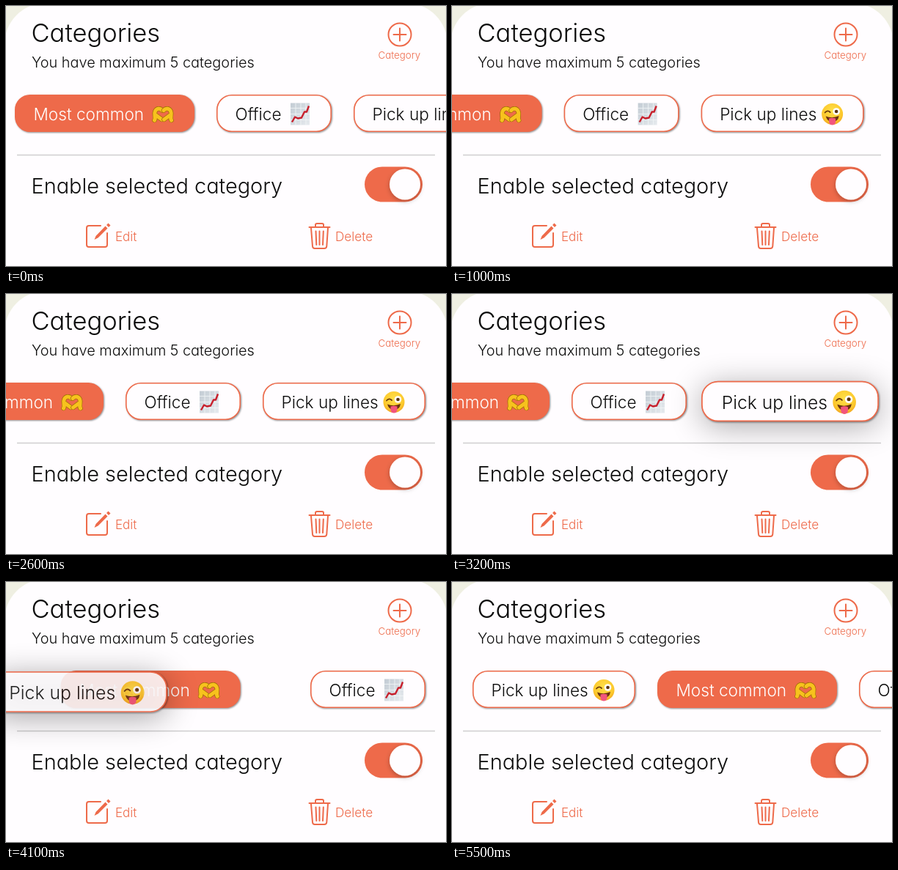
An HTML page that plays this animation: 600 px wide and 355 px high, repeating every 5.6 s.

```html
<!DOCTYPE html>
<html lang="en">
<head>
<meta charset="utf-8">
<title>Category chips</title>
<style>
  html, body { margin: 0; width: 100%; height: 100%; overflow: hidden; background: #efefe2; }
  svg { display: block; width: 600px; height: 355px; }
  text {
    font-family: Inter, Lato, sans-serif;
    font-weight: 300;
    font-feature-settings: "cv11";
    font-optical-sizing: none;
    fill: #0c0c0c;
  }
  .accent text { fill: #ee6a4a; }
  .line { fill: none; stroke: #ee6a4a; stroke-width: 2; stroke-linecap: round; stroke-linejoin: round; }
  .chip rect.box { fill: #fffdff; stroke: #ee6a4a; stroke-width: 1.6; filter: drop-shadow(1.8px 1.8px 1px rgba(0, 0, 0, .45)); }
  .chip.on rect.box { fill: #ee6a4a; }
  .chip.on text { fill: #fff; }
  .chip text { font-size: 22.6px; }
</style>
</head>
<body>
<svg viewBox="0 0 600 355">
  <defs>
    <filter id="soft" x="-60%" y="-200%" width="220%" height="500%"><feGaussianBlur stdDeviation="20"/></filter>
    <filter id="knob" x="-40%" y="-40%" width="180%" height="180%"><feDropShadow dx="0" dy="2" stdDeviation="3" flood-opacity=".28"/></filter>
    <radialGradient id="face" cx=".5" cy=".35" r=".7">
      <stop offset="0" stop-color="#ffe04a"/><stop offset=".7" stop-color="#fcc72b"/><stop offset="1" stop-color="#ee9a1c"/>
    </radialGradient>
    <linearGradient id="paper" x1="0" y1="0" x2="1" y2="1">
      <stop offset="0" stop-color="#c3ccd4"/><stop offset="1" stop-color="#e6eaee"/>
    </linearGradient>
    <g id="hand" fill="none" stroke-linecap="round" stroke-linejoin="round">
      <path id="arm" d="M-11.500 8.500C-9 5 -13 1 -10.500 -4C-8.500 -8 -4 -8.500 -1 -5M-9 2L-1.500 7.500" stroke="#a8700c" stroke-width="6.200"/>
      <use href="#arm"/>
      <path d="M-11.500 8.500C-9 5 -13 1 -10.500 -4C-8.500 -8 -4 -8.500 -1 -5M-9 2L-1.500 7.500" stroke="#f7c21d" stroke-width="5"/>
    </g>
    <g id="heart"><use href="#hand"/><use href="#hand" transform="scale(-1 1)"/></g>
    <g id="chart">
      <rect x="-13" y="-15" width="26" height="30" fill="url(#paper)"/>
      <path d="M-13 -8H13M-13 0H13M-13 8H13M-6 -15V15M1 -15V15M8 -15V15" stroke="#f3f6f8" stroke-width=".8"/>
      <path d="M-11 11L-7 4L-3 6L2 5L6 -3L9 -3L12 -11" fill="none" stroke="#c8202c" stroke-width="2.400" stroke-linejoin="round"/>
    </g>
    <g id="wink">
      <circle r="14.500" fill="url(#face)"/>
      <path d="M-10 -2Q-6.500 -6 -3 -2.500" fill="none" stroke="#6b3b0c" stroke-width="1.800" stroke-linecap="round"/>
      <circle cx="5.500" cy="-3.500" r="4.800" fill="#fff"/>
      <circle cx="5.500" cy="-3.500" r="2.300" fill="#5a3310"/>
      <path d="M-9 3Q0 6.500 9 2.500Q8 10.500 0 10.500Q-7 10.500 -9 3Z" fill="#6b3210"/>
      <path d="M-4.500 6Q0 4.500 4.500 6V10.500A4.500 4.500 0 0 1 -4.500 10.500Z" fill="#f2557c"/>
    </g>
  </defs>

  <rect width="600" height="355" fill="#efefe2"/>
  <rect x="-2" y="-4" width="604" height="440" rx="56" fill="#fffdff"/>
  <text x="34.500" y="48.500" font-size="34.500">Categories</text>
  <text x="35" y="84" font-size="19.900">You have maximum 5 categories</text>
  <path d="M15 203.500H585" stroke="#cfcdcf" stroke-width="1.500"/>
  <text x="34.500" y="256" font-size="28.900">Enable selected category</text>
  <rect x="489" y="219.500" width="79" height="48" rx="24" fill="#ee6a4a"/>
  <circle cx="544" cy="243.500" r="21" fill="#fffdff" filter="url(#knob)"/>

  <g class="accent">
    <g class="line">
      <circle cx="537" cy="39" r="15.500"/>
      <path d="M528.500 39H545.500M537 30.500V47.500"/>
      <path d="M129 300H113Q110 300 110 303V326Q110 329 113 329H135Q138 329 138 326V310"/>
      <path d="M413.500 302H441.500M422 301V299Q422 297 424 297H431Q433 297 433 299V301"/>
      <path d="M416 303L418 328Q418.300 331 421 331H434Q437 331 437.300 328L439 303M422.500 307.500L423.300 326M427.500 307.500V326M432.800 307.500L432 326"/>
    </g>
    <path d="M122.500 314L135.500 300.500L138.500 303.500L125.500 316.500L120.500 319ZM137 299L139.500 296.500L142.500 299.500L140 302Z" fill="#ee6a4a"/>
    <text x="507.500" y="72" font-size="13.300">Category</text>
    <text x="149" y="321" font-size="17">Edit</text>
    <text x="449" y="321" font-size="17.200">Delete</text>
  </g>
  <g id="row"></g>
</svg>
<script>
const LOOP = 5600, STEP = 100, H = 51, MID_Y = 146.5, GAP = 30;
const row = document.getElementById('row');

function makeChip(label, w, icon, iconX, cls = '') {
  const left = -w / 2;
  row.insertAdjacentHTML('beforeend', `<g class="chip ${cls}">
    <rect class="glow" x="${left}" y="${-H / 2 + 6}" width="${w}" height="${H}" rx="20" filter="url(#soft)" opacity="0"/>
    <g class="body">
      <rect class="box" x="${left + .8}" y="${-H / 2 + .8}" width="${w - 1.6}" height="${H - 1.6}" rx="20"/>
      <text x="${left + 25.5}" y="9.5">${label}</text>
      <use href="#${icon}" x="${left + iconX}" y="1"/>
    </g></g>`);
  const el = row.lastElementChild;
  const part = s => el.querySelector(s);
  return { el, w, glow: part('.glow'), body: part('.body'), text: part('text') };
}

const most = makeChip('Most common', 245, 'heart', 202, 'on');
const office = makeChip('Office', 157, 'chart', 114);
const pick = makeChip('Pick up lines', 222, 'wink', 179);

const place = (chip, x, y = MID_Y, scale = 1) =>
  chip.el.setAttribute('transform', `translate(${x} ${y}) scale(${scale})`);
const mix = (a, b, p) => a + (b - a) * p;
const span = (t, a, b) => Math.min(1, Math.max(0, (t - a) / (b - a)));
const smooth = (t, a, b) => { const p = span(t, a, b); return p * p * (3 - 2 * p); };
const easeOut = (t, a, b, n) => 1 - (1 - span(t, a, b)) ** n;

function draw(t) {
  // pull past the end, spring back, later fling to the start
  const scroll = 138 * smooth(t, 0, 650) - 14 * smooth(t, 800, 1400) - 140 * easeOut(t, 4500, 5235, 3);
  const start = 12 - scroll;
  const slot = pick.w + GAP;

  place(most, start + most.w / 2 + slot * smooth(t, 3900, 4200));
  place(office, start + most.w + GAP + office.w / 2 + slot * smooth(t, 3630, 4000));

  // lift, drag to the left, drop into the first slot
  const drop = easeOut(t, 4600, 5100, 2);
  const lift = smooth(t, 2700, 3300) * (1 - drop);
  const held = span(t, 3300, 3301) * (1 - drop);
  const home = start + pick.w / 2 + (t < 3600 ? most.w + office.w + 2 * GAP : 0);
  const drag = smooth(t, 3300, 3800);
  const dragX = mix(461, 93.3, drag) + 4.7 * smooth(t, 3800, 4000);
  place(pick, mix(home, dragX, held), MID_Y + 3.5 * drag * (1 - drop), 1 + .097 * lift);
  pick.glow.setAttribute('opacity', .36 * lift);
  pick.body.setAttribute('opacity', 1 - .13 * drag * (1 - drop));
  pick.text.setAttribute('opacity', 1 - .3 * span(t, 4600, 4700) * (1 - span(t, 4700, 5000)));
}

const began = performance.now();
function tick() {
  const t = (performance.now() - began) % LOOP;
  draw(Math.floor(t / STEP) * STEP);
  requestAnimationFrame(tick);
}
tick();
</script>
</body>
</html>
```
